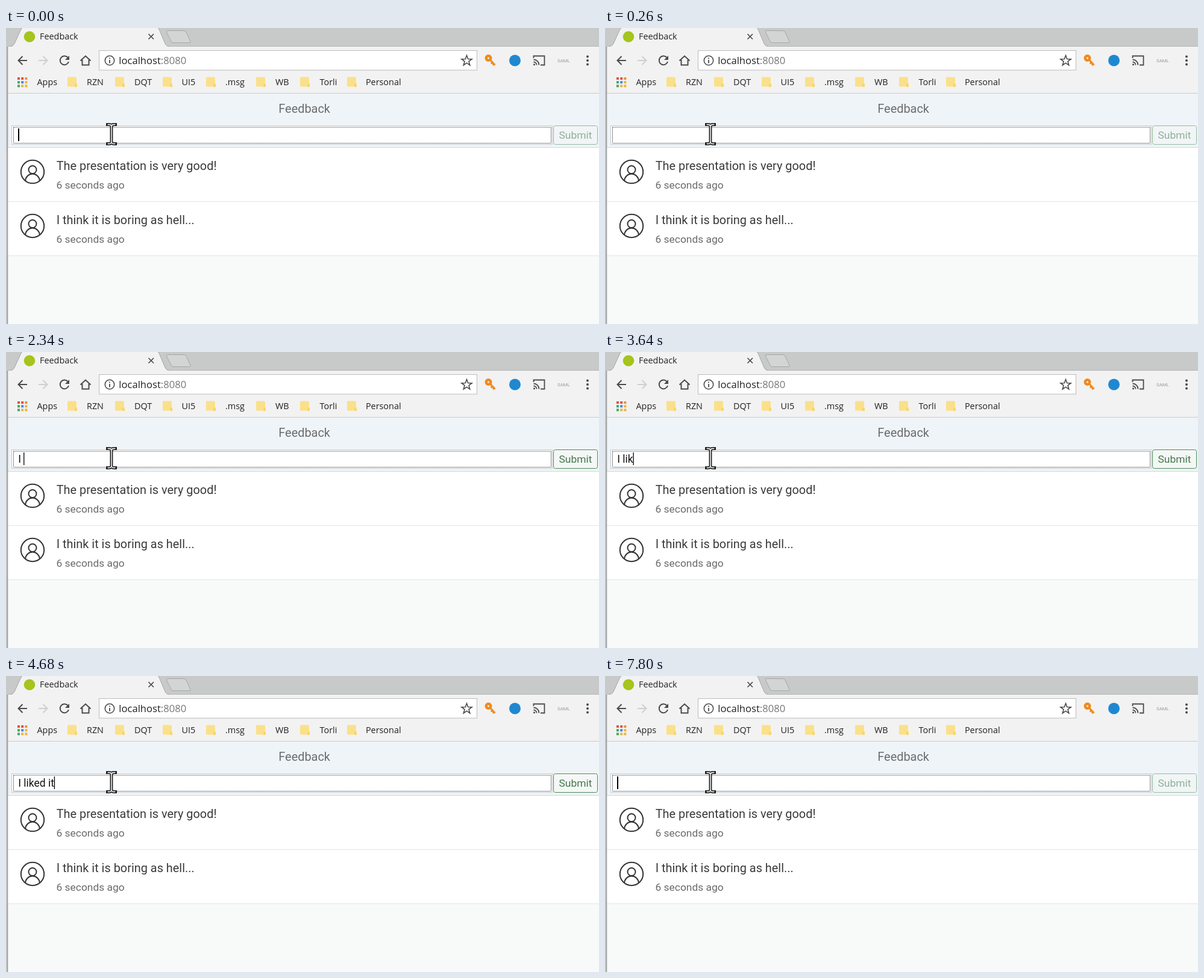
An HTML page for the animation above (8000 ms loop, 984 by 492 pixels).

```html
<!DOCTYPE html>
<html lang="en">
<head>
<meta charset="utf-8">
<title>Feedback</title>
<style>
  html, body { margin: 0; width: 100%; height: 100%; overflow: hidden; background: #f8faf9; }
  svg { display: block; width: 984px; height: 492px; }
  text { white-space: pre; }
  .ui { font: 14.4px "Open Sans", sans-serif; fill: #222; }
  .url { font-size: 16.6px; }
  .page { font: 19.9px Roboto, sans-serif; fill: #3a3a3a; }
  .small { font-size: 17.4px; }
  .line { fill: none; stroke: #4a4a4a; stroke-width: 2; }
</style>
</head>
<body>
<svg viewBox="0 0 984 492" xmlns="http://www.w3.org/2000/svg">
  <defs>
    <g id="folder">
      <path d="M0 1.500Q0 0 1.500 0H13Q15 0 15 2V16H1.500Q0 16 0 14.500Z" fill="#fbe08a"/>
      <path d="M12 11H16V16.500H12Z" fill="#f6d673"/>
    </g>
    <g id="avatar" fill="none" stroke="#333" stroke-width="2">
      <circle r="19.200"/>
      <circle cy="-3.500" r="6.500"/>
      <path d="M-12 14.800C-11 7.500 -6 3.500 0 3.500S11 7.500 12 14.800"/>
    </g>
    <path id="beam" d="M168.500 160.500H171Q175 160.500 175 164Q175 160.500 179 160.500H181.500M175 163V190M168.500 192.500H171Q175 192.500 175 189Q175 192.500 179 192.500H181.500"/>
  </defs>

  <!-- tab strip -->
  <rect width="984" height="492" fill="#c8cac9"/>
  <path d="M3 31H984V108H3Z" fill="#f2f2f2"/>
  <path d="M3 30.500H984" stroke="#b4b6b5"/>
  <path d="M8 31.500Q12 30 14 26L25 2Q26 0 28 0H251Q253 0 254 2L264 26Q266 30 270 31.500Z" fill="#f2f2f2"/>
  <path d="M8 30.500Q12 30 14 26L25 2Q26 0 27 0M252 0Q253 0 254 2L264 26Q266 30 270 30.500" fill="none" stroke="#a3a5a4"/>
  <path d="M268 4.500H295Q298 4.500 299 7L306 22Q307 24.500 304 24.500H278Q275 24.500 274 22L266.500 7Q265.500 4.500 268 4.500Z" fill="#d3d5d4" stroke="#a5a7a6"/>
  <circle cx="39" cy="14.500" r="9.300" fill="#a5c41d"/>
  <text class="ui" x="56" y="19">Feedback</text>
  <path d="M236.500 10L245 18.500M245 10L236.500 18.500" stroke="#4a4a4a" stroke-width="1.700"/>

  <!-- toolbar -->
  <path class="line" d="M35 54H20.500M27.500 47L20.500 54L27.500 61"/>
  <path class="line" d="M54 54H68.500M61.500 47L68.500 54L61.500 61" style="stroke:#cfcfcf"/>
  <path class="line" d="M102.500 49A7.300 7.300 0 1 0 104 56"/>
  <path d="M105 46V53H98Z" fill="#4a4a4a"/>
  <path class="line" d="M123.500 54.500L132 46.500L140.500 54.500M126.500 53V61.500H137.500V53"/>
  <rect x="154.500" y="37.500" width="627" height="32.500" fill="#fff" stroke="#bcbcbc"/>
  <circle class="line" cx="172" cy="54" r="7.700" style="stroke-width:1.600"/>
  <path d="M172 53V58.500M172 49.500V51.300" stroke="#4a4a4a" stroke-width="1.800"/>
  <text class="ui url" x="187.300" y="59.500">localhost<tspan fill="#777">:8080</tspan></text>
  <path id="star" class="line" style="stroke-width:1.600"/>
  <g stroke="#f08a1d" fill="none">
    <circle cx="800.500" cy="50" r="3.800" stroke-width="4.400"/>
    <path d="M803.500 53L811.500 61.500M807 57L805 59.500M810 60L808 62" stroke-width="3"/>
  </g>
  <circle cx="844.500" cy="54" r="9.500" fill="#2088d0"/>
  <path class="line" d="M875.500 50V46.500H893.500V61.500H887M875.500 52.500A9 9 0 0 1 884.500 61.500M875.500 56.500A5 5 0 0 1 880.500 61.500" style="stroke-width:1.800"/>
  <circle cx="876.500" cy="60.800" r="1.500" fill="#4a4a4a"/>
  <text x="915" y="57" font-family="Roboto, sans-serif" font-size="7.800" fill="#999">SAML</text>
  <g fill="#4a4a4a"><circle cx="965" cy="47.500" r="2"/><circle cx="965" cy="54" r="2"/><circle cx="965" cy="60.500" r="2"/></g>
  <g id="marks"></g>

  <!-- page -->
  <path d="M3 108H984V198H3Z" fill="#eff4f8"/>
  <path d="M3 108.500H984" stroke="#cbcccd"/>
  <path d="M3 198H984V378H3Z" fill="#fff"/>
  <path d="M3 378H984V492H3Z" fill="#f8faf9"/>
  <path d="M3 198.500H984" stroke="#d3d8db"/>
  <path d="M3 288.500H984M3 378.500H984" stroke="#e5e5e5"/>
  <path d="M2.500 31V492" stroke="#969898" stroke-width="1.500"/>
  <text class="page" x="452.300" y="140.500" style="fill:#6a6d70">Feedback</text>
  <rect x="9.500" y="162.500" width="897" height="31" fill="#fff" stroke="#c6c9cb"/>
  <rect x="12.500" y="165" width="892" height="26.500" fill="none" stroke="#222" stroke-dasharray="1 1"/>
  <text id="entry" class="page small" x="20.200" y="183.500" style="fill:#111;font-size:17.500px"></text>
  <rect id="caret" y="167" height="21" fill="#000"/>
  <g id="submit">
    <rect x="908.500" y="162.500" width="73" height="31" rx="3" fill="#f4f7f6" stroke="#4a8c54"/>
    <text class="page small" x="917.500" y="183.500" style="fill:#44784c;font-size:17.400px">Submit</text>
  </g>
  <g id="posts"></g>
  <use href="#beam" fill="none" stroke="#151515" stroke-width="4.800" stroke-linecap="square"/>
  <use href="#beam" fill="none" stroke="#e2e2e2" stroke-width="1.800"/>
</svg>
<script>
const LOOP = 8000, ENABLE = 1560, CLEAR = 6760, FADE = 200;
const MESSAGE = "I liked it a lot!";
// [time, characters typed, caret visible]
const STEPS = [
  [0, 0, 1], [260, 0, 0], [780, 0, 1], [1300, 0, 0],
  [ENABLE, 1, 1], [2210, 1, 0], [2340, 2, 1], [2860, 2, 0],
  [3380, 3, 1], [3510, 4, 1], [3640, 5, 1], [3770, 6, 1],
  [4030, 7, 1], [4160, 8, 1], [4420, 9, 1], [4550, 10, 1], [5070, 10, 0],
  [5330, 12, 1], [5460, 14, 1], [5590, 16, 1], [6110, 16, 0],
  [6240, 17, 1], [CLEAR, 0, 1], [7280, 0, 0], [7800, 0, 1]
];
const $ = id => document.getElementById(id);
const entry = $("entry"), caret = $("caret"), submit = $("submit");

function drawStatic() {
  let star = "";
  for (let i = 0; i < 10; i++) {
    const r = i % 2 ? 3.7 : 9, a = (i / 5 - 0.5) * Math.PI;
    star += (i ? "L" : "M") + (764.5 + r * Math.cos(a)).toFixed(2) + " " + (54.5 + r * Math.sin(a)).toFixed(2);
  }
  $("star").setAttribute("d", star + "Z");

  const dots = ["#e0523f", "#e0523f", "#e8913a", "#4aa564", "#4a86d8", "#e9b53a", "#4aa564", "#e9b53a", "#e9b53a"];
  const apps = dots.map((c, i) =>
    `<rect x="${19 + i % 3 * 6.2}" y="${82 + Math.floor(i / 3) * 6.2}" width="4" height="4" fill="${c}"/>`).join("");
  const label = (x, s) => `<text class="ui" x="${x}" y="94.800">${s}</text>`;
  const folders = [[102, 134, "RZN"], [181, 213, "DQT"], [260, 291.5, "UI5"], [332, 364, ".msg"],
    [415, 447, "WB"], [488, 520.5, "Torli"], [566, 596.9, "Personal"]];
  $("marks").innerHTML = apps + label(51.5, "Apps") +
    folders.map(([f, x, s]) => `<use href="#folder" x="${f}" y="81.500"/>` + label(x, s)).join("");

  $("posts").innerHTML = ["The presentation is very good!", "I think it is boring as hell..."].map((s, i) =>
    `<g transform="translate(0 ${i * 90})"><use href="#avatar" x="44" y="239"/>` +
    `<text class="page" x="83.700" y="236.300">${s}</text>` +
    `<text class="page small" x="83.500" y="267" style="fill:#6a6a6a">6 seconds ago</text></g>`).join("");
}

const ramp = (t, start) => Math.min(1, Math.max(0, (t - start) / FADE));

function render(t) {
  const [, count, on] = STEPS.findLast(s => s[0] <= t);
  entry.textContent = MESSAGE.slice(0, count);
  caret.setAttribute("x", 20 + (count ? entry.getComputedTextLength() : 0));
  caret.setAttribute("width", count ? 1.3 : 2);
  caret.style.visibility = on ? "visible" : "hidden";
  submit.setAttribute("opacity", 0.55 + 0.45 * (ramp(t, ENABLE) - ramp(t, CLEAR)));
}

drawStatic();
const begin = performance.now();
function tick() {
  render((performance.now() - begin) % LOOP);
  requestAnimationFrame(tick);
}
tick();
</script>
</body>
</html>
```
